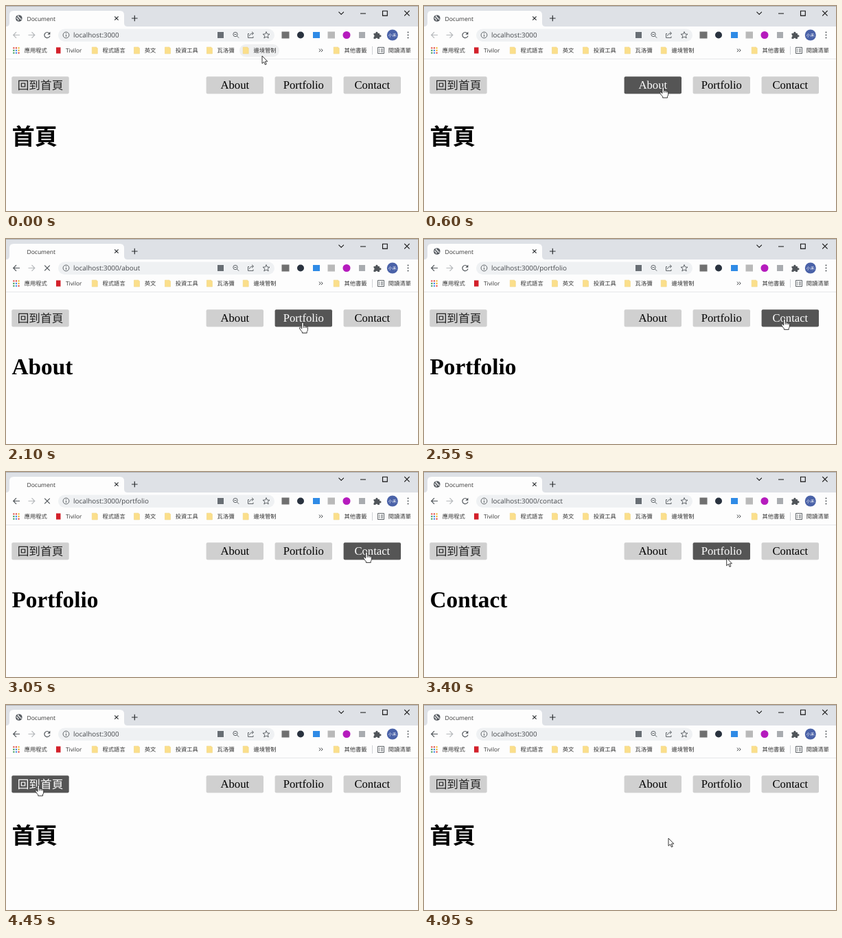
An HTML page for the animation above (5 s loop, 600 by 300 pixels).

```html
<!DOCTYPE html>
<html lang="zh-Hant">
<head>
<meta charset="utf-8">
<title>Document</title>
<style>
  html, body { margin: 0; width: 100%; height: 100%; overflow: hidden; background: #fdfdfd; }
  svg { display: block; width: 600px; height: 300px; text-rendering: geometricPrecision; }
  text { font-family: "Open Sans", "Noto Sans CJK TC", "Noto Sans CJK", sans-serif; fill: #333; }
  .mark text { font-size: 8.3px; }
  .page text { font-family: "Liberation Serif", "Noto Sans CJK TC", "Noto Sans CJK", serif; fill: #000; }
  .page .btn text { font-size: 16.67px; text-anchor: middle; }
  .page .cjk { font-family: "Noto Sans CJK TC", "Noto Sans CJK", sans-serif; }
  .page .btn .cjk { font-weight: 300; fill: #222; }
  .btn rect { fill: #d0d0d0; }
  .btn.on rect { fill: #555; }
  .page .btn.on text { fill: #fff; }
  #head { font-size: 33.33px; font-weight: 700; }
  .line { fill: none; stroke: #50555a; stroke-width: 1.2; }
  .thin { stroke-width: .9; }
  .dark { stroke: #2b2e31; }
  .win { fill: none; stroke: #111; stroke-width: 1.1; }
</style>
</head>
<body>
<svg viewBox="0 0 600 300">
  <rect width="600" height="300" fill="#fdfdfd"/>
  <rect width="600" height="30" fill="#dee1e6"/>
  <rect width="600" height="1" fill="#b0b4b9"/>
  <path d="M0 30Q5 30 5 25V13Q5 7 11 7H166Q172 7 172 13V25Q172 30 177 30Z" fill="#fdfdfd"/>

  <g id="globe">
    <circle cx="18.8" cy="18" r="4.8" fill="#53585e"/>
    <path d="M15 17.2L17.8 19.2V21.6M18 13.8L17.4 15.8L20 17V18.6L22.6 19.4" fill="none" stroke="#fdfdfd" stroke-width="1.2"/>
  </g>
  <text x="30.5" y="21.5" font-size="8.5">Document</text>
  <path class="line dark" d="M158.2 15.3L163.6 20.7M163.6 15.3L158.2 20.7"/>
  <path class="line dark" d="M183 18H191.6M187.3 13.7V22.3"/>
  <path class="win" d="M484.5 8.6L488.2 12.3L491.9 8.6M516 11H524M548.5 7.3H555.3V14.1H548.5ZM580.2 6.9L587.6 14.3M587.6 6.9L580.2 14.3"/>

  <path id="back" class="line" d="M20 42.5H10.8M15 38.2L10.7 42.5L15 46.8"/>
  <path class="line" style="stroke:#b5b8bb" d="M32.5 42.5H41.7M37.5 38.2L41.8 42.5L37.5 46.8"/>
  <g id="reload">
    <path class="line" d="M63.2 40A4.1 4.1 0 1 0 64 43.6"/>
    <path d="M64.4 37.8V41.8H60.4Z" fill="#50555a"/>
  </g>
  <path id="stop" class="line" d="M56.2 38.7L63.8 46.3M63.8 38.7L56.2 46.3"/>
  <rect x="76" y="33.5" width="315" height="18.5" rx="9.25" fill="#eff1f3"/>
  <circle class="line thin" cx="87.5" cy="42.5" r="4.4"/>
  <path class="line thin" d="M87.5 42V45M87.5 39.8V40.9"/>
  <text id="url" x="98" y="46" font-size="9.9" style="fill:#46494d"></text>

  <rect x="308" y="38" width="9" height="9" fill="#686e74"/>
  <circle class="line thin" cx="334" cy="41.5" r="3.2"/>
  <path class="line thin" d="M336.4 44L339.2 46.8M332.4 41.5H335.6"/>
  <path class="line thin" d="M354 40.5H352.5V46.5H360V44.5M354.5 44.2Q355 40 360 40M358 37.8L360.6 40L358 42.2"/>
  <path class="line thin" d="M379 37.6L380.4 41L384 41.2L381.2 43.5L382.2 47L379 45L375.8 47L376.8 43.5L374 41.2L377.6 41Z"/>

  <rect x="401.5" y="37.5" width="11" height="10" fill="#707070"/>
  <circle cx="429" cy="42.5" r="5" fill="#29323f"/>
  <rect x="447" y="38" width="10" height="9" fill="#2f8be6"/>
  <rect x="468.5" y="37.5" width="10.5" height="10" fill="#b9b9b9"/>
  <circle cx="496" cy="42.5" r="5.5" fill="#b51bbd"/>
  <rect x="514" y="38" width="9" height="9" fill="#a9acb0"/>
  <path d="M535.5 40H538.3A1.7 1.7 0 1 1 541.5 40H544V42.4A1.7 1.7 0 1 1 544 45.4V48H541.3A1.6 1.6 0 0 0 538.2 48H535.5V45.2A1.6 1.6 0 0 0 535.5 42.2Z" fill="#50555a"/>
  <circle cx="562.8" cy="42.5" r="8" fill="#4a62a8"/>
  <text x="562.8" y="44.9" font-size="6" text-anchor="middle" style="fill:#fff">小禾</text>
  <g fill="#50555a"><circle cx="585.5" cy="38.6" r="1"/><circle cx="585.5" cy="42.5" r="1"/><circle cx="585.5" cy="46.4" r="1"/></g>

  <rect id="pill" x="340" y="56" width="58" height="18.5" rx="9.25" fill="#eff0f1"/>
  <g id="marks" class="mark"></g>
  <rect x="73" y="60.5" width="6.5" height="9" fill="#d3202a"/>
  <path class="line thin dark" d="M456 62.6L458 64.9L456 67.2M459 62.6L461 64.9L459 67.2"/>
  <path d="M533.5 59V71" stroke="#d0d3d6"/>
  <path class="line thin" d="M541.5 60.5H550.5V69.5H541.5ZM543 63H544.5M546 63H549M543 65H544.5M546 65H549M543 67H544.5M546 67H549"/>
  <path d="M0 77.5H600" stroke="#e6e8ea"/>

  <g class="page">
    <g id="nav"></g>
    <text id="head" x="8.5"></text>
  </g>

  <g id="cursor" stroke-linejoin="round">
    <path id="arrow" d="M0 0V11.2L2.6 8.8L4.4 12.9L6.2 12.1L4.4 8.1H7.8Z" fill="#fff" stroke="#222" stroke-width=".9"/>
    <path id="hand" d="M-1.3 1.2Q-1.3 0 0 0Q1.3 0 1.3 1.2V5Q2.8 4.3 3.6 5.4Q5 4.8 5.6 6Q7.4 5.6 7.4 7.5V10.5Q7.4 12.5 6.2 13.6V15.6H-.6V14Q-2.4 12.4 -4.4 9Q-5 7.6 -3.8 7.3Q-2.8 7.2 -1.3 9.2ZM1.3 5V8M3.6 5.4V8M5.6 6.2V8.2" fill="#fff" stroke="#222" stroke-width=".9"/>
  </g>
</svg>
<script>
const LOOP = 5000, STEP = 50;
const $ = id => document.getElementById(id);

function add(parent, tag, attrs, text = '') {
  const el = document.createElementNS('http://www.w3.org/2000/svg', tag);
  for (const key in attrs) el.setAttribute(key, attrs[key]);
  el.textContent = text;
  return parent.appendChild(el);
}

// Bookmarks: text x, label, folder icon or not
[
  [26.7, '應用程式'], [87, 'Tivilor'], [140.5, '程式語言', 1], [201.7, '英文', 1],
  [246.7, '投資工具', 1], [307.6, '瓦洛彌', 1], [360.4, '邊境管制', 1],
  [492.4, '其他書籤', 1], [556.7, '閱讀清單']
].forEach(([x, label, folder]) => {
  add($('marks'), 'text', { x, y: 68.1 }, label);
  if (folder) add($('marks'), 'path', {
    d: `M${x - 15.2} 60.2h6.6v1.4h1.4v8.2h-8z`, fill: '#fbdf8b', stroke: '#efcf72', 'stroke-width': .5
  });
});

const dots = ['#e0483e', '#e0483e', '#f0b429', '#3c9b56', '#4384e8', '#f0b429', '#3c9b56', '#4384e8', '#e0483e'];
dots.forEach((fill, i) => add($('marks'), 'rect', {
  x: 10.3 + i % 3 * 3.6, y: 60.4 + Math.floor(i / 3) * 3.6, width: 2.1, height: 2.1, fill
}));

const buttons = [[8.3, '回到首頁'], [291.6, 'About'], [391.6, 'Portfolio'], [491.6, 'Contact']].map(([x, label], i) => {
  const el = add($('nav'), 'g', { class: 'btn' });
  add(el, 'rect', { x, y: 103.3, width: 83.4, height: 25.2, rx: 2 });
  add(el, 'text', { x: x + 41.7, y: i ? 121.2 : 122.4, class: i ? '' : 'cjk' }, label);
  return { x, el };
});

// Page loads: start, end, heading, path
const loads = [
  [-1, 0, '首頁', ''],
  [950, 1150, 'About', '/about'],
  [2000, 2200, 'Portfolio', '/portfolio'],
  [2900, 3100, 'Contact', '/contact'],
  [4250, 4450, '首頁', '']
];

// Pointer moves: start, end, x, y, sag
const moves = [
  [0, 0, 373, 73, 0],
  [80, 680, 347, 121, 0],
  [1450, 1850, 432, 122, 0],
  [2220, 2450, 525, 117, 0],
  [3225, 3880, 46, 117, 17],
  [4430, 4950, 356, 195, 0]
];

function pointer(t) {
  let [, , x, y] = moves[0];
  for (const [from, to, nx, ny, sag] of moves.slice(1)) {
    if (t <= from) break;
    const s = Math.min(1, (t - from) / (to - from));
    const e = s * s * (3 - 2 * s);
    x += (nx - x) * e;
    y += (ny - y) * e + sag * Math.sin(Math.PI * e);
  }
  return { x, y };
}

const over = ({ x, y }) => y < 103.3 || y > 128.5 ? -1
  : buttons.findIndex(b => x >= b.x && x <= b.x + 83.4);

const show = (id, on) => $(id).setAttribute('visibility', on ? 'visible' : 'hidden');

function render(t) {
  const page = loads.filter(l => t >= l[1]).pop();
  const busy = loads.some(l => t >= l[0] && t < l[1]);
  const home = page[3] === '';
  $('head').textContent = page[2];
  $('head').setAttribute('class', home ? 'cjk' : '');
  $('head').setAttribute('y', home ? 202.6 : 198);
  $('url').textContent = 'localhost:3000' + page[3];
  $('back').style.stroke = page === loads[0] ? '#b5b8bb' : '';
  show('globe', !busy);
  show('reload', !busy);
  show('stop', busy);

  const p = pointer(t), hit = over(p);
  buttons.forEach((b, i) => b.el.classList.toggle('on', i === hit));
  show('pill', p.y < 74.5);
  // The pointer shape follows the hover with a short lag
  const hand = hit >= 0 && over(pointer(t - 100)) === hit;
  show('hand', hand);
  show('arrow', !hand);
  $('cursor').setAttribute('transform', `translate(${p.x.toFixed(2)} ${p.y.toFixed(2)})`);
}

function tick() {
  render(Math.floor(performance.now() % LOOP / STEP) * STEP);
  requestAnimationFrame(tick);
}
tick();
</script>
</body>
</html>
```
